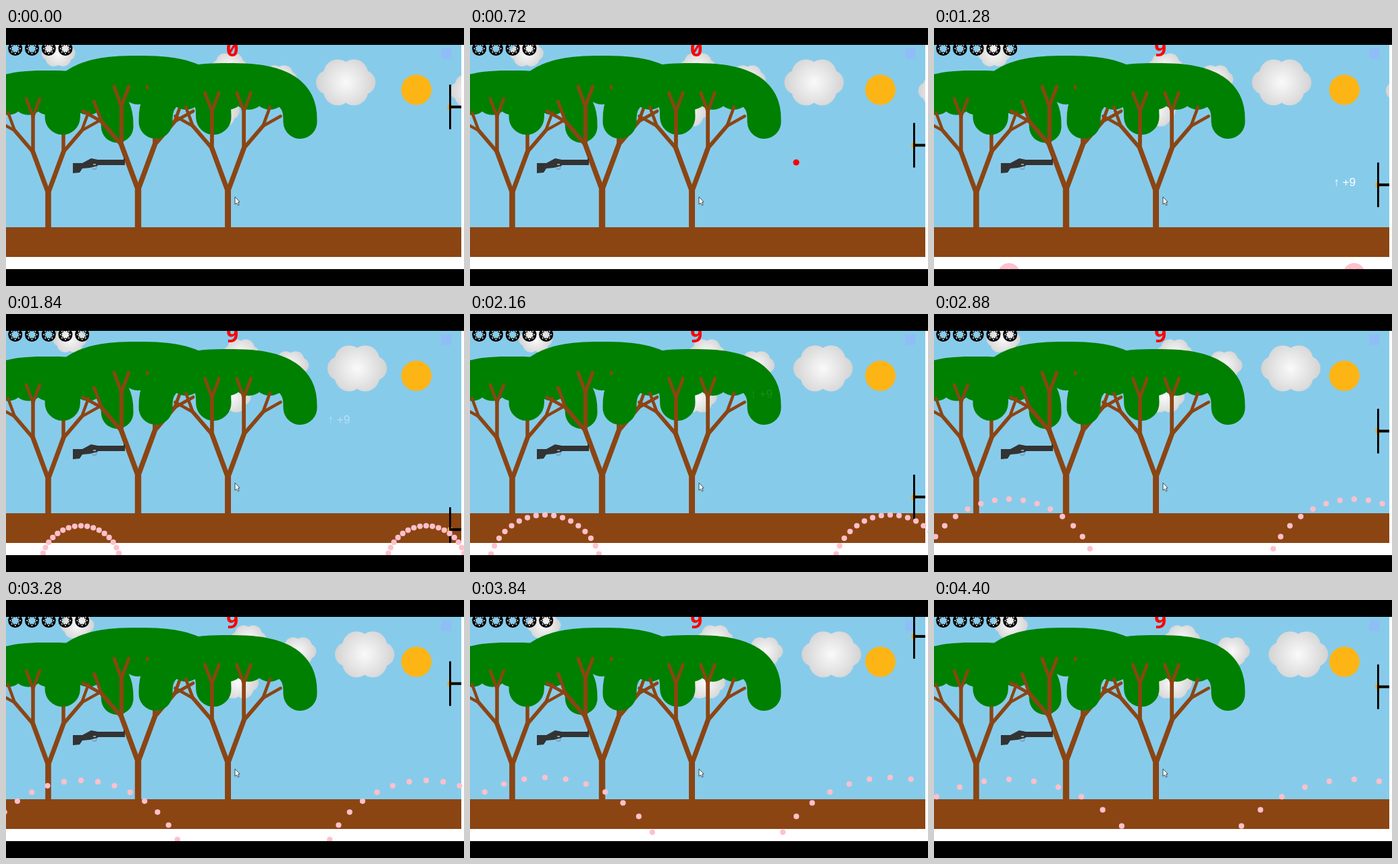
These frames come from a looping animation (678x382 px, 4480 ms). An HTML page with a canvas:

```html
<!DOCTYPE html>
<html lang="en">
<head>
<meta charset="utf-8">
<title>Shooting game</title>
<style>
  html, body { margin: 0; width: 100%; height: 100%; overflow: hidden; background: #000; }
  canvas { display: block; }
</style>
</head>
<body>
<canvas id="stage" width="678" height="382"></canvas>
<script>
const c = document.getElementById('stage').getContext('2d');
const STEP = 80, STEPS = 56, TAU = Math.PI * 2;
const BROWN = '#8b4513', GREEN = '#008000';
const GROUND = 295, BOW_TOP = 53, BOW_BOTTOM = 321;
const FORK = 0.354;

function rect(x, y, w, h, fill) {
  c.fillStyle = fill;
  c.fillRect(x, y, w, h);
}

function dot(x, y, r, fill) {
  c.fillStyle = fill;
  c.beginPath();
  c.arc(x, y, r, 0, TAU);
  c.fill();
}

function line(points, width, color) {
  c.strokeStyle = color;
  c.lineWidth = width;
  c.beginPath();
  for (const [x, y] of points) c.lineTo(x, y);
  c.stroke();
}

function polygon(points, fill) {
  c.fillStyle = fill;
  c.beginPath();
  for (const [x, y] of points) c.lineTo(x, y);
  c.closePath();
  c.fill();
}

function cloud(x, y, scale) {
  c.save();
  c.translate(x, y);
  c.scale(scale, scale);
  const shade = c.createRadialGradient(0, 0, 0, 0, 0, 44);
  shade.addColorStop(0, '#fafafa');
  shade.addColorStop(1, '#d3d3d3');
  for (const s of [-1, 1]) {
    dot(s * 26, 0, 18, shade);
    dot(s * 12, -13, 21, shade);
    dot(s * 12, 13, 21, shade);
  }
  c.restore();
}

// Branches fork three times; the first outward fork is the shorter one.
function branch(x, y, angle, length, depth) {
  const endX = x + length * Math.sin(angle), endY = y - length * Math.cos(angle);
  line([[x, y], [endX, endY]], 9 * 0.8 ** depth, BROWN);
  if (depth === 3) return;
  for (const side of [-1, 1]) {
    const next = depth === 2 ? 30 : length * (side * angle > 0 ? 0.64 : 0.8);
    branch(endX, endY, angle + side * FORK, next, depth + 1);
  }
}

// Tree coordinates start at the foot of the trunk; y points down.
function tree(x, scale) {
  c.save();
  c.translate(x, GROUND);
  c.scale(scale, scale);
  c.lineJoin = c.lineCap = 'round';
  const dome = [];
  for (let u = -1; u <= 1.001; u += 0.05) {
    const dx = Math.sin(u * TAU / 4);
    dome.push([107 * dx, -156 - 62 * Math.max(0, 1 - Math.abs(dx) ** 2.7) ** (1 / 2.7)]);
  }
  line(dome, 50, GREEN);
  for (let dx = -62; dx <= 62; dx += 31) dot(dx, -199, 25, GREEN);
  rect(-4.5, -54, 9, 55, BROWN);
  for (const side of [-1, 1]) branch(0, -53, side * FORK, 68, 1);
  c.lineCap = 'butt';
  c.restore();
}

function gun() {
  polygon([[99, 200], [113, 200], [126, 193], [136, 195], [136, 204], [124, 207], [113, 208], [109, 214], [99, 215]], '#333');
  rect(126, 195, 50, 8, '#333');
  rect(174, 193, 2, 2, '#333');
  rect(129, 201, 4, 2, '#999');
  line([[127, 207], [129, 209], [133, 209], [134, 205]], 1, '#6f8792');
}

function ammo(x) {
  const y = 30.5;
  c.strokeStyle = '#000';
  c.lineWidth = 4.6;
  c.beginPath();
  c.arc(x, y, 8.2, 0, TAU);
  c.stroke();
  for (let i = 0; i < 8; i++) {
    const a = i * TAU / 8, dx = Math.cos(a), dy = Math.sin(a);
    dot(x + dx * 5.7, y + dy * 5.7, 1, '#000');
    dot(x + dx * 7.2, y + dy * 7.2, 1, '#fff');
  }
}

function bow(y) {
  dot(657.5, y, 4, '#ffa500');
  rect(656, y - 33, 3, 66, '#000');
  rect(657, y - 2, 17, 4, '#000');
}

function burst(x, age) {
  const y = 364 + 0.00247 * age * age;
  for (let i = 0; i < 40; i++) {
    const a = i * TAU / 40;
    dot(x + age * Math.sin(a), y - age * Math.cos(a), 4.1, '#ffc0cb');
  }
}

function pointer() {
  const shape = [[339, 250], [339, 261], [341.5, 259], [343.5, 262.5], [345, 261.8], [343.5, 258], [346, 257.6]];
  polygon(shape, '#fff');
  line([...shape, shape[0]], 0.8, '#222');
}

function clip(w, h) {
  c.save();
  c.beginPath();
  c.rect(0, 25, w, h);
  c.clip();
}

// Game time runs slightly unevenly; it is 0 when the bullet hits.
function gameTime(step) {
  return 6 * step - 94 + 16 * Math.sin(Math.PI * step / 55) ** 2;
}

// The bow bounces between two heights, faster after the hit.
function bowHeight(time) {
  const span = BOW_BOTTOM - BOW_TOP;
  const travel = 209 + time * (time < 0 ? 0.98 : 1.93) - BOW_TOP;
  return BOW_TOP + span - Math.abs(span - travel % (2 * span));
}

function draw(step) {
  const time = gameTime(step), hit = time >= 0;
  const drift = (time + 94) * 0.11;

  rect(0, 0, 678, 382, '#000');
  rect(0, 25, 678, 332, '#fff');

  clip(674, 314);
  rect(0, 25, 674, 270, '#87cbeb');
  rect(644, 30, 16, 16, 'rgba(150,180,255,.55)');
  dot(607.5, 91.5, 22.5, '#fdb515');
  cloud(77.5 + drift, 37.5, 0.57);
  cloud(331 + drift, 58, 0.6);
  cloud(404.5 + drift, 76, 0.61);
  cloud(316 + drift, 122.5, 0.68);
  cloud(503 + drift, 80.5, 1);
  cloud(688 + drift, 93, 0.7);
  rect(0, GROUND, 674, 44, BROWN);
  tree(62.5, 0.955);
  tree(195.5, 1.045);
  tree(328.5, 1);
  gun();
  if (step > 0 && !hit) dot(176 + 34.1 * step, 199, 4.6, '#f00');
  bow(bowHeight(time));
  for (let i = 0; i < (hit ? 5 : 4); i++) ammo(13.7 + 24.75 * i);
  c.textAlign = 'center';
  c.fillStyle = '#f00';
  c.font = 'bold 32px "Noto Sans Mono", monospace';
  c.fillText(hit ? '9' : '0', 335, 41.5);
  if (hit) {
    c.globalAlpha = Math.max(0, Math.min(1, 1.15 - time * 0.0125));
    c.textAlign = 'left';
    c.fillStyle = '#fff';
    c.font = '17px "Liberation Sans", Arial, sans-serif';
    c.fillText('↑ +9', 621 - 2.45 * time, 252 - 1.52 * time);
  }
  c.restore();

  if (hit) {
    clip(678, 332);
    burst(111, time);
    burst(622, time);
    c.restore();
  }
  pointer();
}

function tick() {
  draw(Math.floor(performance.now() / STEP) % STEPS);
  requestAnimationFrame(tick);
}
tick();
</script>
</body>
</html>
```
